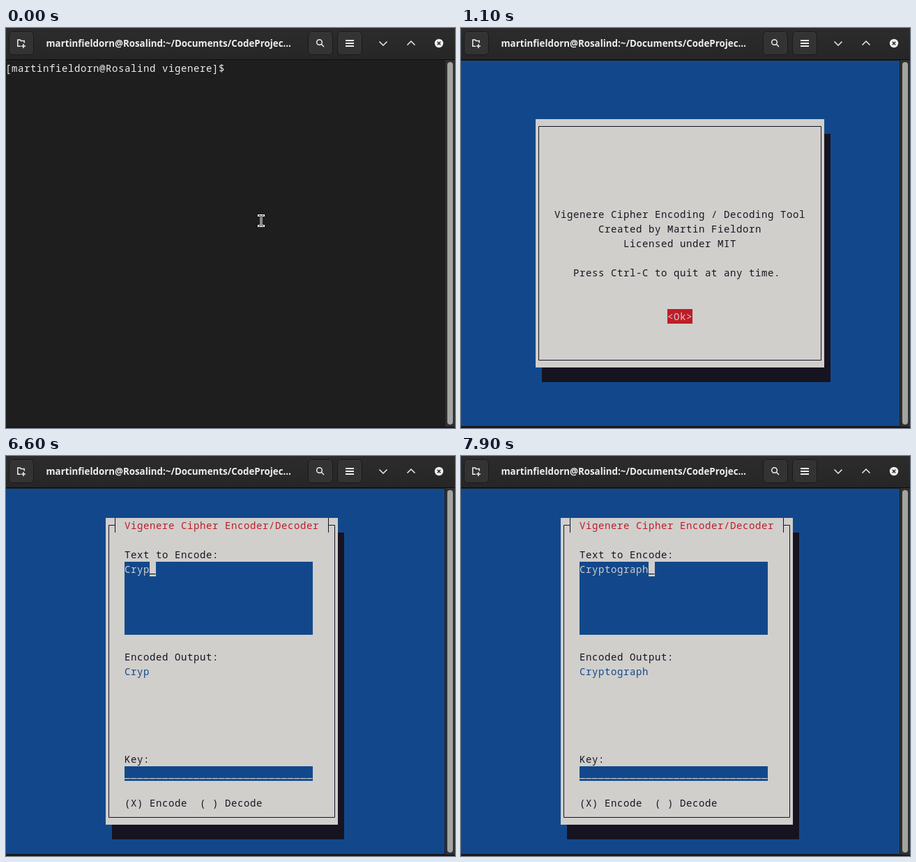
Animation of 644x575 px, one loop 8 s. Source, as an HTML page:

```html
<!DOCTYPE html>
<html lang="en">
<head>
<meta charset="utf-8">
<title>Terminal</title>
<style>
  html, body { margin: 0; width: 100%; height: 100%; overflow: hidden; background: #1e1e1e; }
  svg { display: block; }
  text { white-space: pre; }
  .mono { font: 14px "Noto Sans Mono", "DejaVu Sans Mono", monospace; letter-spacing: .6px; }
  .title { font: bold 13.333px "Noto Sans", "Open Sans", sans-serif; }
  .line { fill: none; stroke: #171421; }
  .icon { fill: none; stroke: #eee; stroke-width: 1.5; }
</style>
</head>
<body>
<svg id="stage" width="644" height="575" viewBox="0 0 644 575"></svg>
<script>
const LOOP = 8000;
const INK = '#171421', PAPER = '#d0cfcc', BLUE = '#12488b', RED = '#c01c28', WHITE = '#eeeeec';
const PROMPT = '[martinfieldorn@Rosalind vigenere]$ ';

// Terminal grid: 9 x 21 px cells
const X = col => col * 9 - 1;
const Y = row => row * 21 + 47;

const rect = (x, y, w, h, fill, more = '') =>
  `<rect x="${x}" y="${y}" width="${w}" height="${h}" fill="${fill}" ${more}/>`;
const cells = (col, row, cols, rows, fill) => rect(X(col), Y(row), cols * 9, rows * 21, fill);
const label = (col, row, str, fill = INK) =>
  `<text class="mono" x="${X(col)}" y="${Y(row) + 16}" fill="${fill}">${str.replace(/</g, '&lt;')}</text>`;
const path = (d, cls, more = '') => `<path class="${cls}" d="${d}" ${more}/>`;
const panel = (col, row, cols, rows) =>
  cells(0, 0, 70, 25, BLUE) + cells(col + 1, row + 1, cols, rows, INK) + cells(col, row, cols, rows, PAPER);

function chrome() {
  const button = x => rect(x + .5, 5.5, 35, 33, '#333', 'rx="5" stroke="#1a1a1a"') +
    rect(x + 3, 6, 30, 1, '#3d3d3d');
  return `<defs><linearGradient id="bar" x2="0" y2="1">
      <stop stop-color="#2c2c2c"/><stop offset="1" stop-color="#262626"/></linearGradient></defs>` +
    rect(0, 0, 644, 575, '#1e1e1e') +
    rect(0, 0, 644, 45, 'url(#bar)') + rect(0, 45, 644, 1, '#0d0d0d') +
    [4, 433, 475].map(button).join('') +
    path('M21 26.2H16.8V17H20.5L21.5 18.5H26.2V21.5M25 23V29M22 26H28', 'icon') +
    `<text class="title" x="57.5" y="27" fill="#eee">martinfieldorn@Rosalind:~/Documents/CodeProjec…</text>` +
    `<circle class="icon" cx="449.5" cy="20.5" r="3.8"/>` + path('M452.3 23.3L456 27', 'icon') +
    path('M487 18H499M487 22H499M487 26H499', 'icon', 'style="stroke-width:2"') +
    path('M535.5 19.5L541 25L546.5 19.5M575.5 24.5L581 19L586.5 24.5', 'icon') +
    `<circle cx="621" cy="22" r="6.2" fill="#eee"/>` +
    path('M618.8 19.8L623.2 24.2M623.2 19.8L618.8 24.2', 'icon', 'style="stroke:#282828"') +
    rect(629, 46, 1, 527, '#1b1b1b') + rect(630, 46, 14, 527, '#303030') +
    rect(633, 49, 8, 521, '#a4a4a3', 'rx="4"') +
    rect(0, 573, 644, 2, '#14161b');
}

function pointer() {
  const d = 'M362.5 269.5H365L366 270.5L367 269.5H369.5M366 270.5V283.5M362.5 284.5H365L366 283.5L367 284.5H369.5';
  return path(d, '', 'fill="none" stroke="#fff" stroke-width="3" stroke-linecap="square"') +
    path(d, '', 'fill="none" stroke="#111"');
}

function shell(typed, block, mouse) {
  return label(0, 0, PROMPT + typed, WHITE) +
    (block ? cells(...block, 1, 1, WHITE) : '') + (mouse ? pointer() : '');
}

function welcome() {
  return panel(12, 4, 46, 17) + path('M111.5 141.5H516.5V477.5H111.5Z', 'line') +
    label(15, 10, 'Vigenere Cipher Encoding / Decoding Tool') +
    label(22, 11, 'Created by Martin Fieldorn') +
    label(26, 12, 'Licensed under MIT') +
    label(18, 14, 'Press Ctrl-C to quit at any time.') +
    cells(33, 17, 4, 1, RED) + label(33, 17, '<Ok>', PAPER);
}

function form(typed) {
  const end = 19 + typed.length;
  return panel(16, 2, 37, 21) +
    path('M156.5 99.5H147.5V519.5H471.5V99.5H462.5M156.5 89V110M462.5 89V110', 'line') +
    label(19, 2, 'Vigenere Cipher Encoder/Decoder', RED) +
    label(19, 4, 'Text to Encode:') + cells(19, 5, 30, 5, BLUE) +
    label(19, 5, typed, PAPER) + cells(end, 5, 1, 1, PAPER) + label(end, 5, '_') +
    label(19, 11, 'Encoded Output:') + label(19, 12, typed, BLUE) +
    label(19, 18, 'Key:') + cells(19, 19, 30, 1, BLUE) + label(19, 19, '_'.repeat(30), PAPER) +
    label(19, 21, '(X) Encode  ( ) Decode');
}

const keyTimes = [5900, 6200, 6400, 6600, 6700, 6800, 7000, 7200, 7400, 7600, 7900];
const steps = [
  [0, shell('', null, true)],
  [400, shell('c', [37, 0])],
  [600, shell('cargo run', [45, 0])],
  [1000, shell('cargo run', [0, 1])],
  [1100, welcome()],
  [5300, form('')],
  ...keyTimes.map((time, i) => [time, form('Cryptograph'.slice(0, i + 1))])
];

const stage = document.getElementById('stage');
stage.innerHTML = chrome() + '<g id="screen"></g>';
const screen = document.getElementById('screen');
let shown = -1;

function draw() {
  const t = performance.now() % LOOP;
  const now = steps.filter(([time]) => time <= t).length - 1;
  if (now !== shown) {
    shown = now;
    screen.innerHTML = steps[now][1];
  }
  requestAnimationFrame(draw);
}
draw();
</script>
</body>
</html>
```
